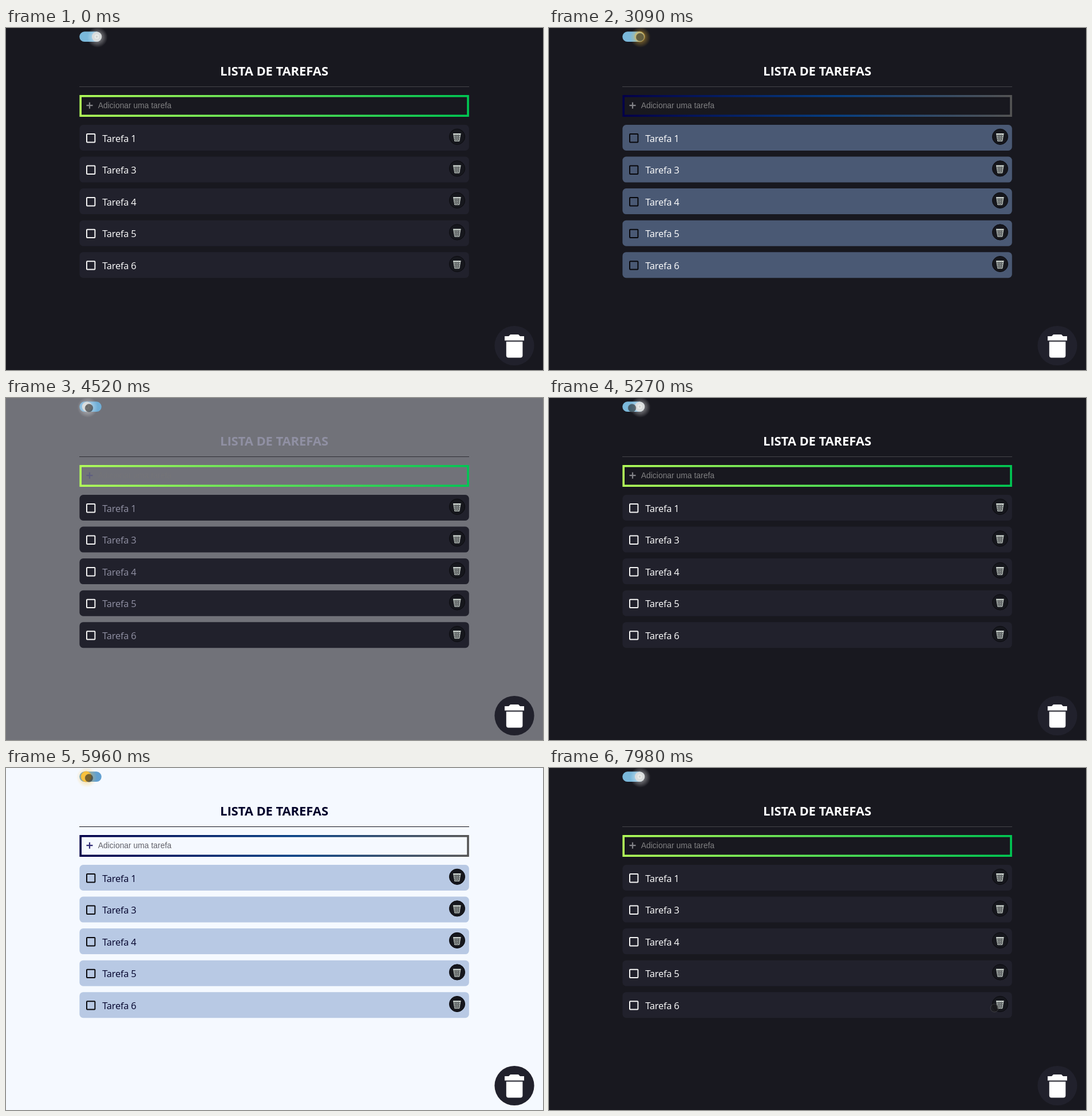
An HTML page for the animation above (8 s loop, 938 by 597 pixels).

```html
<!DOCTYPE html>
<html lang="pt">
<head>
<meta charset="utf-8">
<title>Lista de tarefas</title>
<style>
html, body { margin: 0; width: 100%; height: 100%; overflow: hidden; background: #18181f; }
svg { display: block; width: 938px; height: 597px; }
text { font-family: "Open Sans", "Noto Sans", sans-serif; }
.title { font-size: 22px; font-weight: 700; letter-spacing: -.1px; text-anchor: middle; }
.task { font-size: 16.6px; letter-spacing: -.3px; }
.hint { font: 13.9px "Liberation Sans", Arial, sans-serif; }
</style>
</head>
<body>
<svg viewBox="0 0 938 597">
  <defs>
    <linearGradient id="green">
      <stop offset="0" stop-color="#b2ff59"/><stop offset="1" stop-color="#00c853"/>
    </linearGradient>
    <linearGradient id="navy">
      <stop offset="0" stop-color="#03004a"/><stop offset=".55" stop-color="#064084"/>
      <stop offset="1" stop-color="#555"/>
    </linearGradient>
    <radialGradient id="moonGlow">
      <stop offset=".35" stop-color="#fff" stop-opacity=".4"/><stop offset="1" stop-color="#fff" stop-opacity="0"/>
    </radialGradient>
    <radialGradient id="sunGlow">
      <stop offset=".35" stop-color="#f9c23c" stop-opacity=".4"/><stop offset="1" stop-color="#f9c23c" stop-opacity="0"/>
    </radialGradient>
    <pattern id="mesh" width="3" height="3" patternUnits="userSpaceOnUse">
      <path d="M0 0L3 3M3 0L0 3" stroke="#c9d2cc" stroke-width=".9"/>
    </pattern>
  </defs>
  <rect id="page" width="938" height="597"/>

  <rect id="pill" x="128.3" y="6.3" width="38.5" height="17.7" rx="8.85"/>
  <g id="knob">
    <circle id="glow" cx="1" cy="1" r="18"/>
    <g id="moon">
      <circle r="8.7" fill="#d9dcdc"/>
      <circle r="4" fill="#e9ebe8"/>
      <circle r="1.8" fill="#cfd2d0"/>
    </g>
    <circle id="sun" r="9" fill="#f9c23c" stroke="#e5b040"/>
  </g>

  <text class="title ink" x="468.5" y="83">LISTA DE TAREFAS</text>
  <path id="rule" d="M128 102.5H809"/>
  <rect id="field" x="130.2" y="118.8" width="676.8" height="34.4" fill="none" stroke-width="3.6"/>
  <path id="plus" d="M140.5 135.2h11M146 129.7v11" stroke-width="2.2"/>
  <text id="hint" class="hint" x="160.8" y="140.2">Adicionar uma tarefa</text>
  <g id="list"></g>

  <circle cx="888" cy="554.5" r="34.6" fill="#21212c"/>
  <path fill="#fff" d="M871 538h7l3-3h14l3 3h7v7.5h-34zM873.8 547.4h28.6v24q0 4-4 4h-20.6q-4 0-4-4z"/>
  <circle id="pointer" r="7" fill="rgba(28,28,28,.58)" stroke="rgba(120,120,120,.35)"/>
</svg>
<script>
const LOOP = 8000, FADE = 500;
const $ = id => document.getElementById(id);
const all = s => [...document.querySelectorAll(s)];
const set = (e, name, value) => e.setAttribute(name, value);
const clamp = v => Math.min(1, Math.max(0, v));
const mix = (a, b, k) => a + (b - a) * k;
const tint = (a, b, k) => `rgb(${a.map((v, i) => Math.round(mix(v, b[i], k)))})`;

$('list').innerHTML = [1, 3, 4, 5, 6].map((n, i) => `
  <g transform="translate(0 ${(i * 55.55).toFixed(2)})">
    <rect class="card" x="128.4" y="169" width="680.4" height="45" rx="6.5"/>
    <rect class="box" x="141" y="185" width="14.4" height="14.4" rx="1" fill="none" stroke-width="2"/>
    <text class="task ink" x="168.3" y="198.5">Tarefa ${n}</text>
    <circle cx="788" cy="189.8" r="13.6" fill="#16171d" stroke="#0b0b0f"/>
    <path d="M781.8 185.5h12l-2 12h-8z" fill="url(#mesh)" stroke="#c3ccc6"/>
    <path d="M781 184.8h13.6" stroke="#d5ddd7" stroke-width="1.6"/>
  </g>`).join('');
const cards = all('.card'), boxes = all('.box'), inks = all('.ink');

// fade starts; the theme alternates dark to light to dark
const fades = [3160, 4348, 5420, 6964];
const LEAD = 75; // cards and borders switch ahead of the fade

// pointer trips: eased legs from a start point, resting between legs
const trips = [
  { from: 1390, to: 1668, x: 312, y: 591, legs: [[1390, 1668, 17, 492]] },
  { from: 1930, to: LOOP, x: 9, y: 159, legs: [
    [1930, 2330, 194, 8], [2330, 2670, 165, 137], [2740, 2940, 159, 16],
    [3770, 3980, 145, 17.5], [7190, 7980, 778, 419]] }
];

// CSS "ease": cubic-bezier(.25, .1, .25, 1)
function ease(x) {
  if (x <= 0 || x >= 1) return clamp(x);
  const bez = (u, p, q) => 3 * p * u * (1 - u) ** 2 + 3 * q * u * u * (1 - u) + u ** 3;
  let lo = 0, hi = 1;
  for (let i = 0; i < 20; i++) {
    const m = (lo + hi) / 2;
    if (bez(m, .25, .25) < x) lo = m; else hi = m;
  }
  return bez(lo, .1, 1);
}

function theme(t) {
  const n = fades.filter(f => t >= f - LEAD).length;
  if (!n) return { light: 0, k: 0, slide: 0 };
  const light = n % 2, age = t - fades[n - 1];
  const fade = ease(age / FADE);
  const move = light ? clamp((age - 70) / 140) : ease((age - 150) / 250);
  return { light, k: light ? fade : 1 - fade, slide: light ? move : 1 - move };
}

function pointerAt(t) {
  const trip = trips.find(r => t >= r.from && t < r.to);
  if (!trip) return null;
  let { x, y } = trip;
  for (const [a, b, toX, toY] of trip.legs) {
    const k = Math.sin(clamp((t - a) / (b - a)) * Math.PI / 2);
    x = mix(x, toX, k);
    y = mix(y, toY, k);
  }
  return [x, y];
}

function draw(t) {
  const { light, k, slide } = theme(t);
  const inkK = clamp(k * 1.08);
  const ink = tint([255, 255, 255], [0, 0, 42], inkK);
  set($('page'), 'fill', tint([24, 24, 31], [245, 249, 255], k));
  inks.forEach(e => set(e, 'fill', ink));
  set($('rule'), 'stroke', tint([70, 70, 75], [15, 15, 22], k));
  set($('plus'), 'stroke', tint([130, 130, 135], [50, 46, 120], inkK));
  set($('hint'), 'fill', tint([128, 128, 130], [98, 98, 105], k));
  set($('field'), 'stroke', light ? 'url(#navy)' : 'url(#green)');
  cards.forEach(e => set(e, 'fill', light ? 'rgba(124,154,201,.5)' : '#21212c'));
  boxes.forEach(e => set(e, 'stroke', light ? '#08080c' : '#f4f4f4'));

  set($('pill'), 'fill', tint([122, 184, 218], [98, 160, 208], k));
  set($('knob'), 'transform', `translate(${mix(158.6, 140, slide)} 15.1)`);
  set($('glow'), 'fill', light ? 'url(#sunGlow)' : 'url(#moonGlow)');
  set($('moon'), 'opacity', 1 - light);
  set($('sun'), 'opacity', light * clamp(.4 + 2 * slide));

  const p = pointerAt(t);
  set($('pointer'), 'visibility', p ? 'visible' : 'hidden');
  if (p) set($('pointer'), 'transform', `translate(${p})`);
}

const begin = performance.now();
function tick() {
  draw((performance.now() - begin) % LOOP);
  requestAnimationFrame(tick);
}
draw(0);
requestAnimationFrame(tick);
</script>
</body>
</html>
```
